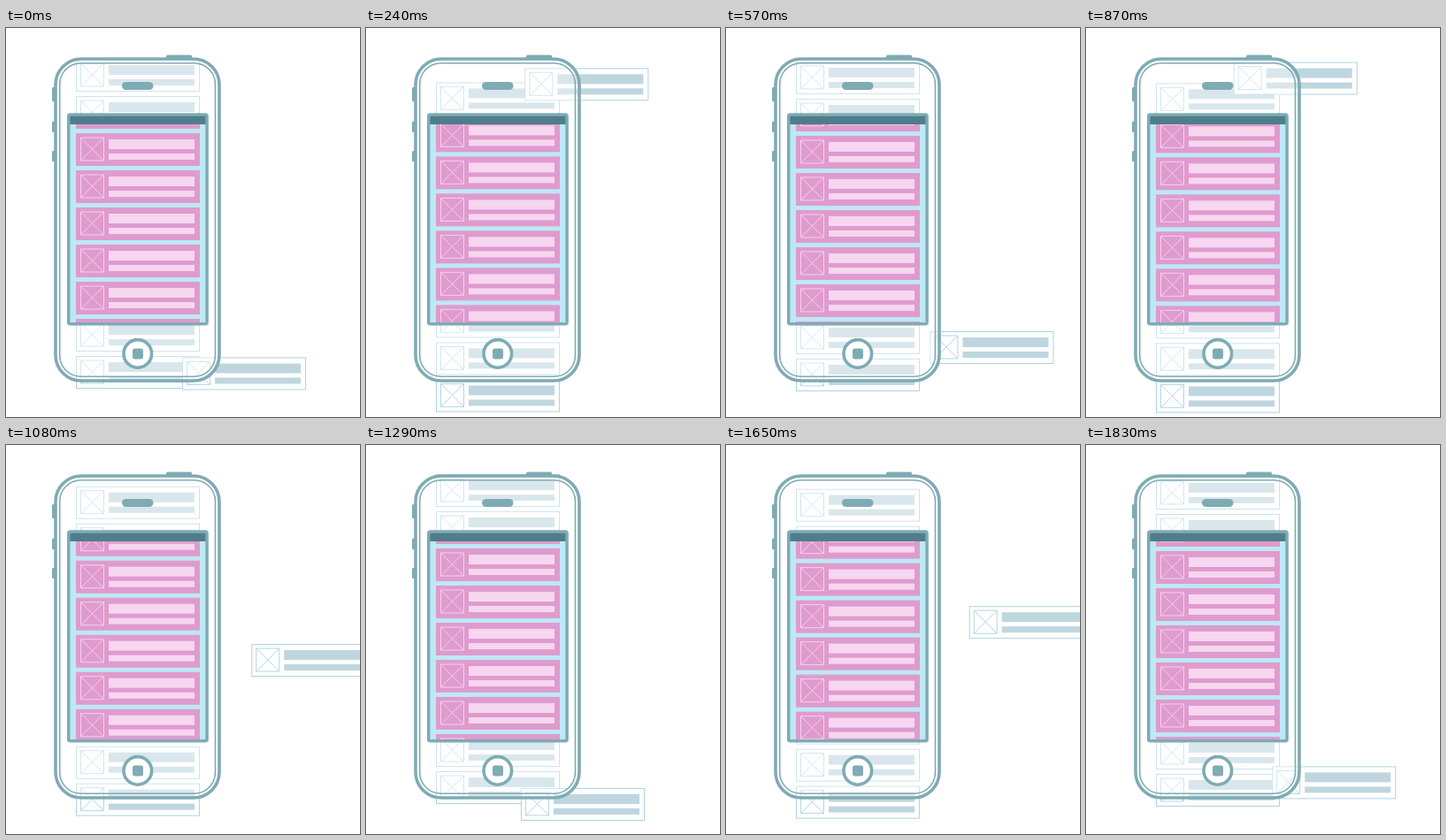
Recreate the animation shown at these times as an HTML page with a canvas. Size 400 px wide and 440 px high, loop 1860 ms.

```html
<!DOCTYPE html>
<html lang="en">
<head>
<meta charset="utf-8">
<title>Recycled list rows</title>
<style>
html, body { margin: 0; width: 100%; height: 100%; overflow: hidden; background: #fff; }
canvas { display: block; width: 400px; height: 440px; }
</style>
</head>
<body>
<canvas id="stage" width="400" height="440"></canvas>
<script>
const ctx = document.getElementById('stage').getContext('2d');
const TICK = 30, TICKS = 62;
const PITCH = 42, ROW_X = 79.5, ROW_W = 139, ROW_H = 36;
const LIFT = 8.62;        // scroll at which the top row takes off
const FIRST_Y = 68.88;    // top resting row at that moment
const TEAL = '#7fabb4', SLATE = '#4f7d8b';
const PALE = { fill: '#ffffff', edge: '#aed2df', bar: '#bfd6df', line: '#b4d6e2' };
const PINK = { fill: '#df9bce', edge: '#df9bce', bar: '#f7d6ef', line: '#f5d0eb' };

// tick -> animation step; the pace is slightly uneven
const PACE = [[0, 0], [8, 8], [19, 20], [20, 20], [29, 29], [43, 44], [49, 50], [61, 64], [62, 64.5]];

function stepAt(tick) {
  let i = 0;
  while (tick >= PACE[i + 1][0]) i++;
  const [t0, s0] = PACE[i], [t1, s1] = PACE[i + 1];
  return Math.round(s0 + (s1 - s0) * (tick - t0) / (t1 - t0));
}

function smooth(x) {
  x = Math.max(0, Math.min(1, x));
  return x * x * (3 - 2 * x);
}

function box(x, y, w, h, r) {
  ctx.beginPath();
  ctx.roundRect(x, y, w, h, r);
}

function fillBox(x, y, w, h, r, color) {
  box(x, y, w, h, r);
  ctx.fillStyle = color;
  ctx.fill();
}

function strokeBox(x, y, w, h, r, color, width) {
  box(x, y, w, h, r);
  ctx.strokeStyle = color;
  ctx.lineWidth = width;
  ctx.stroke();
}

function drawRow(x, y, c) {
  ctx.fillStyle = c.fill;
  ctx.fillRect(x, y, ROW_W, ROW_H);
  ctx.lineWidth = 1;
  ctx.strokeStyle = c.edge;
  ctx.strokeRect(x, y, ROW_W, ROW_H);
  const a = x + 5, b = y + 4.5, s = 26;
  ctx.strokeStyle = c.line;
  ctx.beginPath();
  ctx.rect(a, b, s, s);
  ctx.moveTo(a, b);
  ctx.lineTo(a + s, b + s);
  ctx.moveTo(a + s, b);
  ctx.lineTo(a, b + s);
  ctx.stroke();
  ctx.fillStyle = c.bar;
  ctx.fillRect(x + 36.5, y + 6.5, 97, 11);
  ctx.fillRect(x + 36.5, y + 22.5, 97, 7);
}

// half circle from the top of the list round to its bottom
function flyerAt(m) {
  const angle = Math.PI * m / PITCH;
  const off = smooth(Math.min(angle, Math.PI - angle) / 0.42);
  const r = 189 + 7.5 * off;
  return [ROW_X + 2 * off + r * Math.sin(angle), 215.9 - r * Math.cos(angle)];
}

function drawPhone() {
  for (const [y, h] of [[67, 16], [105.5, 12.5], [139, 12]]) fillBox(52, y, 4, h, 1.5, TEAL);
  fillBox(181, 30.5, 29, 5, 1.5, TEAL);
  fillBox(56, 35, 185, 364, 29, 'rgba(255,255,255,0.4)');
  strokeBox(56, 35, 185, 364, 29, TEAL, 3.6);
  strokeBox(60.7, 39.7, 175.8, 354.6, 24, TEAL, 1.6);
  fillBox(131, 61, 35.5, 9, 4.5, TEAL);

  ctx.beginPath();
  ctx.arc(148.8, 368.4, 15.8, 0, 2 * Math.PI);
  ctx.fillStyle = '#fff';
  ctx.fill();
  ctx.strokeStyle = TEAL;
  ctx.lineWidth = 3.6;
  ctx.stroke();
  fillBox(143, 362.5, 12, 12, 2.5, TEAL);
}

function drawScreen(rowY) {
  fillBox(71, 98, 156, 236.5, 2, '#bde8f4');
  ctx.save();
  ctx.beginPath();
  ctx.rect(72, 108, 154, 226);
  ctx.clip();
  for (let i = 0; i < 9; i++) drawRow(ROW_X, rowY + i * PITCH, PINK);
  ctx.restore();
  ctx.fillStyle = SLATE;
  ctx.fillRect(72, 99, 154, 10);
  strokeBox(70.7, 98, 156.4, 236.8, 2, TEAL, 3.5);
}

function draw(tick) {
  const scroll = stepAt(tick) * 3 * PITCH / 64.5;
  const m = (scroll - LIFT + PITCH) % PITCH;
  const rowY = FIRST_Y - m;
  ctx.fillStyle = '#fff';
  ctx.fillRect(0, 0, 400, 440);
  for (let i = 0; i < 9; i++) drawRow(ROW_X, rowY + i * PITCH, PALE);
  drawRow(...flyerAt(m), PALE);
  drawPhone();
  drawScreen(rowY);
}

const start = performance.now();
function loop() {
  const t = performance.now() - start;
  draw(Math.floor(t / TICK) % TICKS);
  requestAnimationFrame(loop);
}
loop();
</script>
</body>
</html>
```
